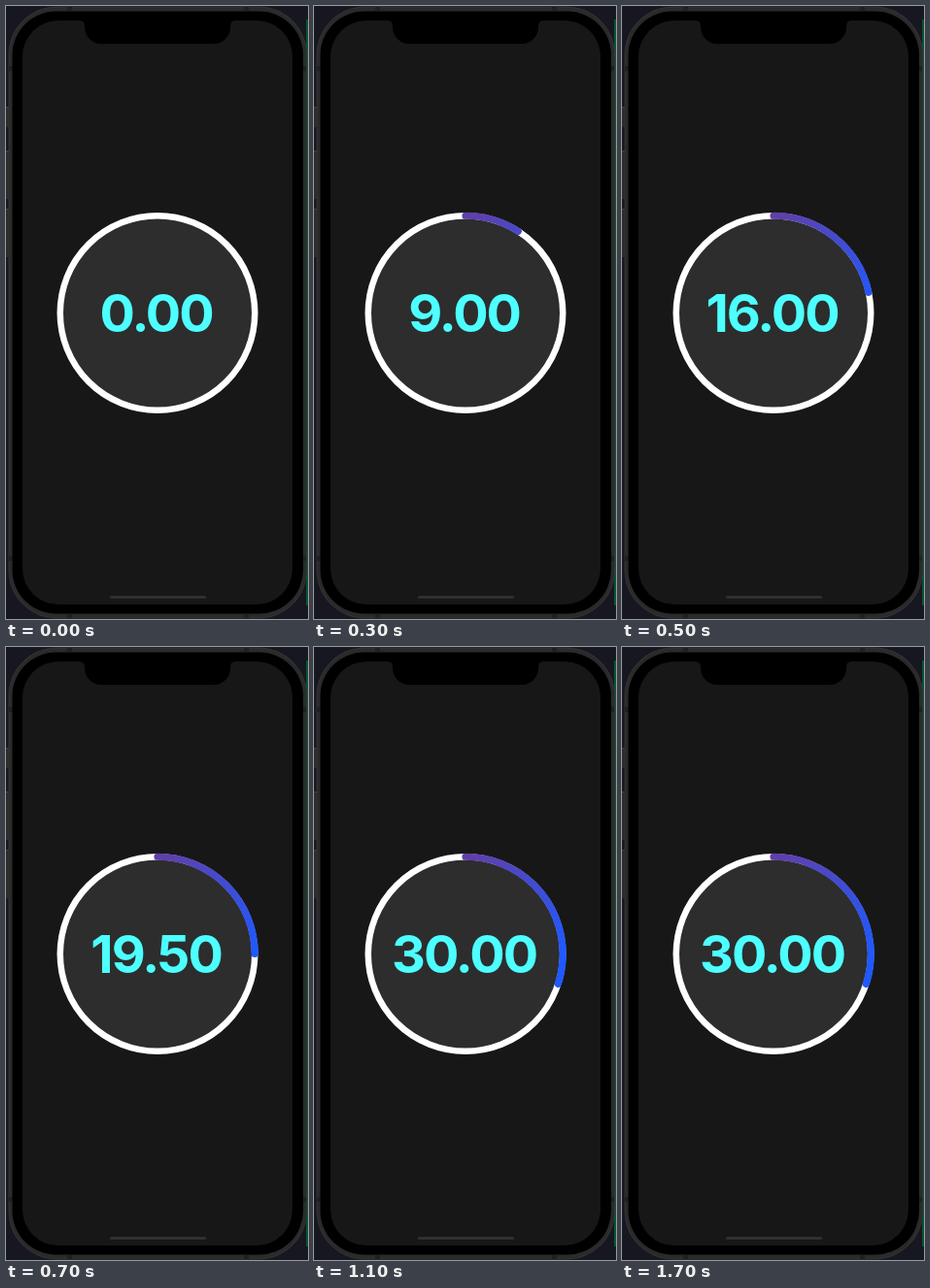
Recreate the animation shown at these times as an HTML page with a canvas. Size 311 by 632 pixels, loop 2 s.

```html
<!DOCTYPE html>
<html lang="en">
<head>
<meta charset="utf-8">
<title>Progress ring</title>
<style>
html, body { margin: 0; width: 100%; height: 100%; overflow: hidden; background: #171722; }
canvas { display: block; }
</style>
</head>
<body>
<canvas id="stage"></canvas>
<script>
const W = 311, H = 632, LOOP = 2000, TICK = 100;
const CX = 156, CY = 316.5, R = 100.25;
const canvas = document.getElementById('stage');
const ctx = canvas.getContext('2d');
const dpr = window.devicePixelRatio || 1;
canvas.width = W * dpr;
canvas.height = H * dpr;
canvas.style.width = W + 'px';
canvas.style.height = H + 'px';
ctx.scale(dpr, dpr);

// Ring progress in percent for each counter step.
const ARC = [0, 0.6, 3.8, 9.1, 15.4, 21.6, 25, 28.8, 30, 30];

function box(x, y, w, h, r, color) {
  ctx.fillStyle = color;
  ctx.beginPath();
  ctx.roundRect(x, y, w, h, r);
  ctx.fill();
}

function gradient(x0, y0, x1, y1, ...colors) {
  const g = ctx.createLinearGradient(x0, y0, x1, y1);
  colors.forEach((c, i) => g.addColorStop(i / (colors.length - 1), c));
  return g;
}

function drawPhone() {
  box(0, 0, W, H, 0, '#171722');
  box(309, 14, 2, 604, 0, '#07512f');
  for (const [y, h] of [[104, 21], [149, 50], [209, 50]]) {
    box(0, y, 4, h, 0, '#2b2b2b');
    box(0, y, 4, 1, 0, '#444444');
  }
  box(2.5, 0.5, 307.5, 631, 50, '#343434');
  box(3.5, 1.5, 305.5, 629, 49, '#2a2a2a');
  for (const x of [63, 245]) {
    box(x, 1, 5, 4, 0, '#202020');
    box(x, 627, 5, 4, 0, '#202020');
  }
  for (const y of [62, 567]) {
    box(3, y, 4, 5, 0, '#202020');
    box(305, y, 4, 5, 0, '#202020');
  }
  box(6.5, 5.5, 299.5, 621, 45, '#000000');
  box(17, 15, 278, 602, 37, '#171717');
  drawNotch();
  box(107, 608, 99, 3, 1.5, '#303030');
}

function drawNotch() {
  ctx.fillStyle = '#000000';
  ctx.beginPath();
  ctx.moveTo(76, 14);
  ctx.lineTo(76, 15);
  ctx.quadraticCurveTo(81, 15, 81, 21);
  ctx.arcTo(81, 39, 99, 39, 17);
  ctx.arcTo(231, 39, 231, 21, 17);
  ctx.lineTo(231, 21);
  ctx.quadraticCurveTo(231, 15, 236, 15);
  ctx.lineTo(236, 14);
  ctx.fill();
}

function drawRing(percent) {
  ctx.lineWidth = 6.5;
  ctx.lineCap = 'round';
  ctx.beginPath();
  ctx.arc(CX, CY, R, 0, Math.PI * 2);
  ctx.fillStyle = '#2d2d2d';
  ctx.fill();
  ctx.strokeStyle = '#ffffff';
  ctx.stroke();
  if (!percent) return;
  const start = -Math.PI / 2;
  ctx.lineWidth = 7.2;
  ctx.beginPath();
  ctx.arc(CX, CY, R, start, start + percent / 100 * Math.PI * 2);
  ctx.strokeStyle = gradient(CX, CY - R, CX + R, CY, '#613fa7', '#1f59ff');
  ctx.stroke();
}

function drawCount(value) {
  ctx.font = '700 54px Inter, Roboto, sans-serif';
  ctx.letterSpacing = '-2px';
  ctx.textAlign = 'center';
  ctx.textBaseline = 'alphabetic';
  ctx.fillStyle = '#4dffff';
  ctx.fillText(value.toFixed(2), CX - 1.4, 335.8);
}

// The counter holds for one tick at 700 ms and again at 1000 ms.
function stepAt(ms) {
  const n = Math.floor(ms / TICK);
  return Math.min(9, n - (n >= 7) - (n >= 10));
}

function draw(now) {
  const step = stepAt(now % LOOP);
  drawPhone();
  drawRing(ARC[step]);
  drawCount(Math.max(0, 3.5 * step - 1.5));
}

function frame() {
  draw(performance.now());
  requestAnimationFrame(frame);
}
frame();
</script>
</body>
</html>
```
